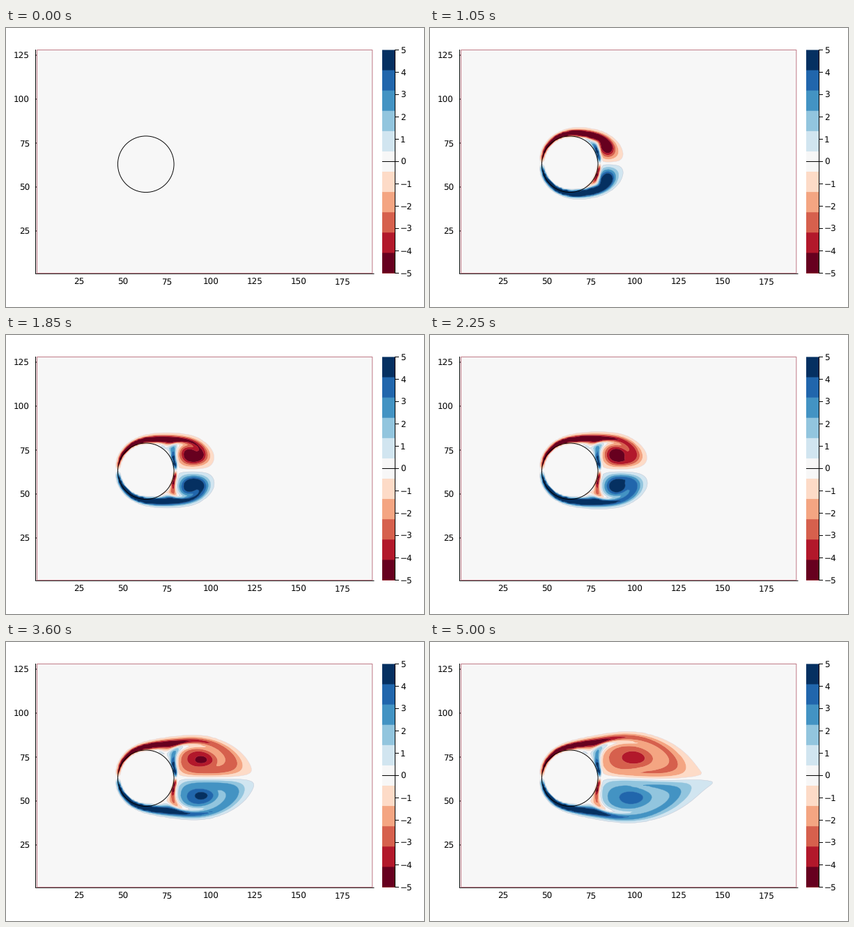
A matplotlib script that plays this animation: 600x400 px, repeating every 5050 ms.

```python
"""Vorticity behind a cylinder set impulsively into a stream."""
import numpy as np
import matplotlib.pyplot as plt
from matplotlib.animation import FuncAnimation
from matplotlib.patches import Circle, Rectangle

FRAMES, INTERVAL = 101, 50
NX, NY = 192, 128          # inner cells
R, CENTRE = 16, 64         # cylinder, in cells
NU = R / 250               # viscosity for a unit stream
FLOAT = np.float32
COLORS = ["#67001f", "#b2182b", "#d6604d", "#f4a582", "#fddbc7", "#f7f7f7",
          "#d1e5f0", "#92c5de", "#4393c3", "#2166ac", "#053061"]


# ---------- immersed body ----------

def body_moments():
    """Kernel moments of the smoothed body on the velocity faces."""
    mu0 = np.ones((2, NX + 2, NY + 2))
    mu1 = np.zeros((2, 2, NX + 2, NY + 2))
    for i in range(2):
        x = np.arange(1, NX + 3)[:, None] - 0.5 * (i == 0) - CENTRE
        y = np.arange(1, NY + 3)[None, :] - 0.5 * (i == 1) - CENTRE
        r = np.hypot(x, y)
        d = np.clip(r - R, -1, 1)
        s, c = np.sin(np.pi * d), np.cos(np.pi * d)
        mu0[i] = 0.5 + 0.5 * d + 0.5 * s / np.pi
        k1 = 0.25 * (1 - d**2) - 0.5 * (d * s + (1 + c) / np.pi) / np.pi
        r = np.maximum(r, 1e-6)
        mu1[i, 0], mu1[i, 1] = k1 * x / r, k1 * y / r
    return mu0, mu1


# ---------- pressure solver: cosine modes plus a body correction ----------

def cosine_modes(n):
    k = np.arange(n)
    modes = np.sqrt(2 / n) * np.cos(np.pi * np.outer(k + 0.5, k) / n)
    modes[:, 0] = np.sqrt(1 / n)
    return modes, 2 * np.cos(np.pi * k / n) - 2


def body_correction(cx, cy, inv, mu):
    """Dense matrix turning the free solution near the body into sources."""
    n = len(cx)
    h = (cx[:, None] * cx).reshape(n * n, -1) @ inv
    k = (cy[:, None] * cy).reshape(n * n, -1)
    green = (h @ k.T).reshape(n, n, n, n).transpose(0, 2, 1, 3)
    green = green.reshape(n * n, n * n)
    ids = np.arange(n * n).reshape(n, n)
    change = np.zeros((n * n, n * n))
    for a, b, m in ((ids[:-1], ids[1:], mu[0][1:]),
                    (ids[:, :-1], ids[:, 1:], mu[1][:, 1:])):
        a, b, e = a.ravel(), b.ravel(), m.ravel() - 1
        change[a, a] -= e
        change[b, b] -= e
        change[a, b] += e
        change[b, a] += e
    return -change @ np.linalg.inv(np.eye(n * n) + green @ change)


mu0, mu1 = body_moments()
mu_p = np.maximum(mu0, 1e-3)
LO, HI = CENTRE - R - 3, CENTRE + R
CX, lam_x = cosine_modes(NX)
CY, lam_y = cosine_modes(NY)
lam = lam_x[:, None] + lam_y[None, :]
lam[0, 0] = 1
INV = 1 / lam
INV[0, 0] = 0
FIX = body_correction(CX[LO:HI], CY[LO:HI], INV,
                      mu_p[:, LO + 1:HI + 1, LO + 1:HI + 1])

CX, CY, INV, FIX, mu0, mu_p = (a.astype(FLOAT) for a in (CX, CY, INV, FIX, mu0, mu_p))
half_mu1 = (0.5 * mu1[:, :, 1:-1, 1:-1]).astype(FLOAT)
BX, BY = CX[LO:HI].copy(), CY[LO:HI].copy()


def project(u):
    """Remove the divergence of u in place."""
    z = (u[0][2:, 1:-1] - u[0][1:-1, 1:-1]) + (u[1][1:-1, 2:] - u[1][1:-1, 1:-1])
    zh = (CX.T @ z @ CY) * INV
    near = BX @ zh @ BY.T
    q = (FIX @ near.ravel()).reshape(near.shape)
    zh += (BX.T @ q @ BY) * INV
    p = CX @ zh @ CY.T
    u[0][2:-1, 1:-1] -= mu_p[0][2:-1, 1:-1] * (p[1:] - p[:-1])
    u[1][1:-1, 2:-1] -= mu_p[1][1:-1, 2:-1] * (p[:, 1:] - p[:, :-1])


# ---------- momentum ----------

def along(a, axis):
    return a if axis == 0 else a.T


def bound(u, scale=1):
    for i, speed in enumerate((scale, 0)):
        side, normal = along(u[i], 1 - i), along(u[i], i)
        side[0], side[-1] = side[1], side[-2]
        normal[:2] = speed
        normal[-1] = speed


def median(a, b, c):
    return np.maximum(np.minimum(a, b), np.minimum(np.maximum(a, b), c))


def face_flux(f, w):
    """Limited QUICK advection and diffusion along the first axis."""
    pad = np.concatenate((f[:1], f, f[-1:]))
    a, b, c, d = pad[:-3], pad[1:-2], pad[2:-1], pad[3:]
    fwd = w > 0
    far, up, down = np.where(fwd, a, d), np.where(fwd, b, c), np.where(fwd, c, b)
    limit = median(10 * up - 9 * far, up, down)
    value = median((5 * up + 2 * down - far) / 6, up, limit)
    return w * value - NU * (c - b)


def forces(u):
    r = np.zeros_like(u)
    for i in range(2):
        for j in range(2):
            mean = u[j].copy()
            s = along(mean, i)
            s[1:] = 0.5 * (s[1:] + s[:-1])
            flux = face_flux(along(u[i], j), along(mean, j)[1:])
            along(r[i], j)[1:-1] -= flux[1:] - flux[:-1]
    return r


def with_body(f):
    out = mu0 * f
    for i in range(2):
        out[i][1:-1, 1:-1] += (half_mu1[i, 0] * (f[i][2:, 1:-1] - f[i][:-2, 1:-1])
                               + half_mu1[i, 1] * (f[i][1:-1, 2:] - f[i][1:-1, :-2]))
    return out


def step(u0, dt):
    u = with_body(u0 + dt * forces(u0))
    bound(u)
    project(u)
    bound(u)
    u += with_body(u0 + dt * forces(u))
    bound(u, 2)
    project(u)
    u *= 0.5
    bound(u)
    return u


def stable_dt(u):
    out = (np.maximum(u[0][2:, 1:-1], 0) + np.maximum(-u[0][1:-1, 1:-1], 0)
           + np.maximum(u[1][1:-1, 2:], 0) + np.maximum(-u[1][1:-1, 1:-1], 0))
    return 1 / (float(out.max()) + 5 * NU)


X0, X1, Y0, Y1 = 38, 168, 30, 98    # part of the grid that is contoured


def vorticity(u):
    w = (u[1][1:, 1:] - u[1][:-1, 1:]) - (u[0][1:, 1:] - u[0][1:, :-1])
    return np.clip(R * w[X0 - 1:X1 - 1, Y0 - 1:Y1 - 1].T, -5, 5)


def simulate():
    u = np.zeros((2, NX + 2, NY + 2), FLOAT)
    u[0] = 1
    t, dt, fields = 0.0, 0.25, []
    for n in range(FRAMES):
        while t < 0.1 * n * R - 1e-9:
            u = step(u, dt)
            t += dt
            dt = stable_dt(u)
        fields.append(vorticity(u))
    return fields


# ---------- drawing, in pixels ----------

def px(x):
    return 42 + 2.52 * x


def py(y):
    return 354 - 2.52 * y


PT = 0.72                           # points per pixel at 100 dpi
plt.rcParams["text.hinting"] = "none"
plt.rcParams["text.hinting_factor"] = 1
fig = plt.figure(figsize=(6, 4), dpi=100, facecolor="white")
ax = fig.add_axes([0, 0, 1, 1])
ax.set_xlim(0, 600)
ax.set_ylim(400, 0)
ax.axis("off")


def line(x0, y0, x1, y1):
    ax.plot([x0, x1], [y0, y1], color="black", lw=PT, zorder=3,
            solid_capstyle="butt", snap=False)


def label(x, y, value, ha):
    ax.text(x, y, str(value).replace("-", "\u2212"), ha=ha,
            va="center_baseline", family="DejaVu Sans", size=12 * PT)


left, right, top, bottom = px(1), px(NX), py(NY), py(1)
area = (left, top), right - left, bottom - top
ax.add_patch(Rectangle(*area, fc=COLORS[5], ec="none", zorder=0, snap=False))
ax.add_patch(Rectangle(*area, fc="none", ec="#c07a87", lw=PT, zorder=4, snap=False))
ax.add_patch(Circle((px(63), py(63)), 2.52 * R, fc="none", ec="black",
                    lw=0.95 * PT, zorder=4))

line(42.5, 31, 42.5, 352)
line(42, 352.3, 528.5, 352.3)
for v in range(25, 200, 25):
    label(px(v), 363.5, v, "center")
    if v <= 125:
        line(42.5, py(v), 44.5, py(v))
        label(34, py(v), v, "right")

# Each band reaches down to the bottom, so that no seams show.
band = (bottom - top) / len(COLORS)
for n, color in enumerate(reversed(COLORS)):
    y = top + n * band
    ax.add_patch(Rectangle((540, y), 18, bottom - y, fc=color, ec="none",
                           zorder=1, snap=False))
line(558.5, top, 558.5, bottom)
for v in range(-5, 6):
    y = (top + bottom) / 2 - v * (bottom - top) / 10
    line(540 if v == 0 else 558, y, 564, y)
    label(566, y, v, "left")

levels = np.linspace(-5, 5, 12)[1:-1]
grid_x, grid_y = px(np.arange(X0, X1)), py(np.arange(Y0, Y1))
fields = simulate()
layers = []


def draw(n):
    while layers:
        layers.pop().remove()
    if n == 0:
        return
    fill = ax.contourf(grid_x, grid_y, fields[n], levels, colors=COLORS,
                       extend="both", antialiased=True, zorder=1)
    fill.set_edgecolor("face")
    fill.set_linewidth(0.3)
    edge = ax.contour(grid_x, grid_y, fields[n], levels[4:6], colors="#67001f",
                      linestyles="solid", linewidths=0.4 * PT, alpha=0.15, zorder=2)
    layers.extend((fill, edge))


anim = FuncAnimation(fig, draw, frames=FRAMES, init_func=lambda: draw(0),
                     interval=INTERVAL, repeat=True, repeat_delay=0, blit=False)
plt.show()
```
